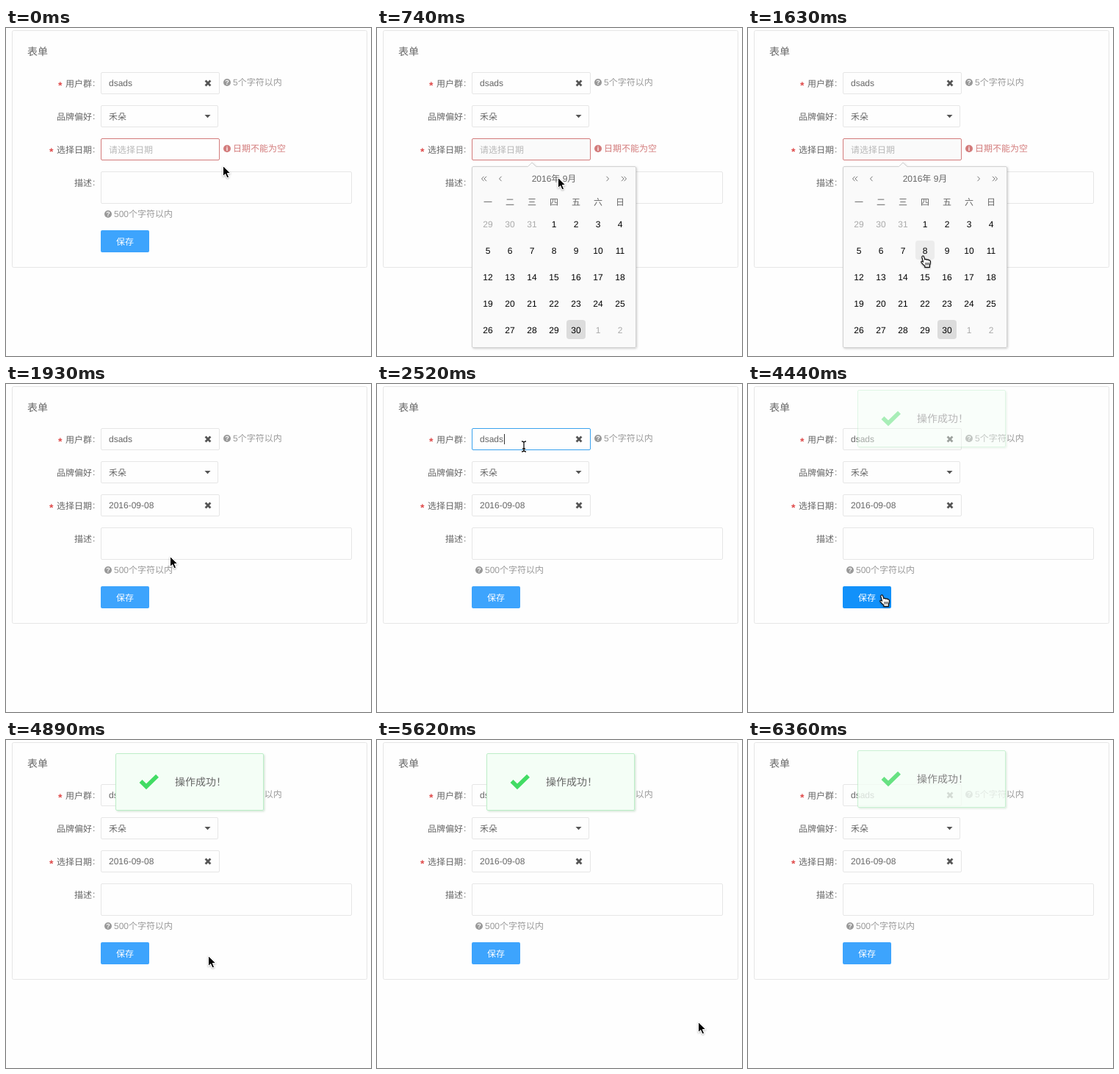
Animation of 497x446 px, one loop 6460 ms. Source, as an HTML page:

```html
<!DOCTYPE html>
<html lang="zh-CN">
<head>
<meta charset="utf-8">
<title>表单</title>
<style>
  html, body { margin: 0; width: 100%; height: 100%; overflow: hidden; background: #fefefe; }
  svg { display: block; position: absolute; left: 0; top: 0; }
  text { font: 12px "Liberation Sans", "Noto Sans CJK SC", "Noto Sans CJK", sans-serif; fill: #666; white-space: pre; text-rendering: geometricPrecision; }
  .big { font-size: 14px; }
  .hint { fill: #999; }
  .err { fill: #d37b7b; }
  .ghost { fill: #b8b8b8; }
  .star { font-size: 14px; font-weight: bold; fill: #e04c4c; }
  .mark { font-size: 9px; font-weight: bold; fill: #fefefe; text-anchor: middle; }
  .mid { text-anchor: middle; }
  .day { fill: #000; text-anchor: middle; }
  .off { fill: #aaa; text-anchor: middle; }
  .box { fill: #fefefe; stroke: #e6e6e6; }
  .cross { stroke: #555; stroke-width: 2.8; }
  .chev { fill: none; stroke: #777; }
</style>
</head>
<body>
<svg id="stage" width="497" height="446" viewBox="0 0 497 446">
  <defs>
    <filter id="shadow" x="-10%" y="-10%" width="120%" height="125%">
      <feDropShadow dx="1" dy="1" stdDeviation="1.5" flood-color="#000" flood-opacity=".2"/>
    </filter>
    <filter id="glow" x="-10%" y="-10%" width="120%" height="130%">
      <feDropShadow dx="1.5" dy="1.5" stdDeviation="1" flood-color="#3c8c50" flood-opacity=".22"/>
    </filter>
    <filter id="drop" x="-30%" y="-30%" width="170%" height="170%">
      <feDropShadow dx="0" dy="1" stdDeviation=".8" flood-opacity=".35"/>
    </filter>
  </defs>
  <g id="form"></g>
  <g id="popup" filter="url(#shadow)"></g>
  <g id="toast">
    <rect x="149.5" y=".5" width="201" height="77" rx="1.5" fill="#f4fef6" stroke="#bdeec8" filter="url(#glow)"/>
    <path d="M183.5 38L191 45.3L206 30.8" fill="none" stroke="#42dc64" stroke-width="5.6"/>
    <text class="big" x="230" y="44">操作成功！</text>
  </g>
  <g id="cursor">
    <path id="arrow" filter="url(#drop)" stroke="#fff" d="M.5 .5V14.6L3.7 11.6L6 16.8L8.6 15.7L6.3 10.6H10.8Z"/>
    <g id="hand" filter="url(#drop)" stroke="#111" stroke-linejoin="round">
      <path fill="#fff" stroke-width="1.2" d="M4.6 9.2L2.9 2.9C2.5 .9 5 .2 5.6 2.1L6.9 6C7.6 4.9 9.2 5.2 9.5 6.3C10.4 5.5 11.8 5.8 12.1 6.9C13.2 6.4 14.3 7 14.4 8.3C14.6 10.5 14.2 12 13.4 13.6V16.3H6.8V14.6C5.2 13.4 3.4 11.4 2.1 9.8C1.2 8.4 2.9 7.5 4.6 9.2Z"/>
      <path stroke-width=".9" d="M8 10V13.5M10 10V13.5M12 10V13.5"/>
    </g>
    <g id="beam" fill="none">
      <path stroke="#fff" stroke-width="2.6" d="M-3 -7Q0 -7 0 -5V5Q0 7 -3 7M3 -7Q0 -7 0 -5M0 5Q0 7 3 7"/>
      <path stroke="#111" stroke-width="1.3" d="M-3 -7Q0 -7 0 -5V5Q0 7 -3 7M3 -7Q0 -7 0 -5M0 5Q0 7 3 7M-2 3H2"/>
    </g>
  </g>
</svg>
<script>
const LOOP = 6460;
const STEP = 148; // the picture moves on once per step
const $ = id => document.getElementById(id);

const text = (x, y, s, cls = '') => `<text class="${cls}" x="${x}" y="${y}">${s}</text>`;
const box = (x, y, w, h, id = '') =>
  `<rect id="${id}" class="box" x="${x + .5}" y="${y + .5}" width="${w - 1}" height="${h - 1}" rx="1.5"/>`;
const cross = y => `<path class="cross" d="M271.6 ${y - 3.4}l6.8 6.8m0 -6.8l-6.8 6.8"/>`;
const hint = (x, y, s, mark = '?', cls = 'hint') =>
  `<circle class="${cls}" cx="${x}" cy="${y}" r="5"/>` + text(x, y + 3.2, mark, 'mark') + text(x + 8, y + 4.4, s, cls);
const chev = (x, dir) => `<path class="chev" d="M${x + 1.5 * dir} 201.8l${-3 * dir} 3.2l${3 * dir} 3.2"/>`;

function label(y, s, required) {
  const x = 117 - 12 * s.length;
  return (required ? text(x - 10, y + 8, '*', 'star') : '') + text(x, y + 4.5, s) + text(118, y + 4.3, ':');
}

function form() {
  const [name, brand, date, note] = [0, 1, 2, 3].map(i => 75 + 45 * i);
  return '<rect x="8.5" y="3.5" width="483" height="322" rx="2" fill="#fefefe" stroke="#e6e6e6"/>' +
    text(29, 37, '表单', 'big') +
    label(name, '用户群', true) + box(129, name - 15, 162, 30, 'name') + text(140, name + 4, 'dsads') + cross(name) +
    '<path id="caret" d="M173.5 68V82" stroke="#333"/>' + hint(301, name - 1, '5个字符以内') +
    label(brand, '品牌偏好') + box(129, brand - 15, 160, 30) + text(140, brand + 4.5, '禾朵') +
    '<path d="M270.5 118h8l-4 4.3z" fill="#555"/>' +
    label(date, '选择日期', true) + box(129, date - 15, 162, 30, 'date') +
    `<g id="empty">${text(140, date + 4.5, '请选择日期', 'ghost')}${hint(301, date - 1, '日期不能为空', 'i', 'err')}</g>` +
    `<g id="filled">${text(140, date + 4, '2016-09-08')}${cross(date)}</g>` +
    label(note, '描述') + box(129, note - 15, 342, 44) + hint(139, 253, '500个字符以内') +
    '<rect id="save" x="129" y="275" width="66" height="30" rx="2"/>' +
    '<text x="150" y="294.5" style="fill:#fff">保存</text>';
}

function calendar() {
  const col = i => 151 + 30 * (i % 7);
  const row = i => 266 + 36 * Math.floor(i / 7);
  const cell = (i, fill, id = '') =>
    `<rect id="${id}" x="${col(i) - 13}" y="${row(i) - 13}" width="26" height="26" rx="4" fill="${fill}"/>`;
  let s = '<path d="M131 188.5H205.5L211 183L216.5 188.5H351Q352.5 188.5 352.5 190V433Q352.5 434.5 351 434.5H131Q129.5 434.5 129.5 433V190Q129.5 188.5 131 188.5Z" fill="#fafafa" stroke="#d2d2d2"/>' +
    text(241, 209, '2016年 9月', 'mid') + cell(10, '#ececec', 'hover') + cell(32, '#dcdcdc');
  for (const dir of [1, -1]) for (const gap of [73, 93.5, 97]) s += chev(241 - gap * dir, dir);
  for (let i = 0; i < 7; i++) s += text(col(i), 240.5, '一二三四五六日'[i], 'mid');
  for (let i = 0; i < 35; i++) {
    const n = i - 2;
    const day = n < 1 ? n + 31 : n > 30 ? n - 30 : n;
    s += text(col(i), row(i) + 4.5, day, day === n ? 'day' : 'off');
  }
  return s;
}

$('form').innerHTML = form();
$('popup').innerHTML = calendar();

// key points of the pointer: step, x, y
const keys = [
  [0, 295, 187], [4, 250, 168], [8, 234, 309], [11, 234, 309], [17, 200, 85], [19, 200, 85],
  [24, 256, 163], [27, 178, 286], [30, 178, 286], [33, 275, 293], [35, 324, 304], [39, 475, 409]
];

const ramp = (k, a, b) => Math.min(1, Math.max(0, (k - a) / (b - a)));
const during = (k, a, b) => k >= a && k < b;
const show = (id, on) => $(id).style.display = on ? '' : 'none';

function pointer(k) {
  const i = Math.max(1, keys.findIndex(p => p[0] >= k));
  const [a, ax, ay] = keys[i - 1], [b, bx, by] = keys[i];
  const p = ramp(k, a, b);
  return [ax + (bx - ax) * p, ay + (by - ay) * p].map(Math.round);
}

function draw(k) {
  const hand = during(k, 8, 13) || during(k, 27, 31);
  const beam = during(k, 17, 20);
  const [x, y] = pointer(k);
  $('cursor').setAttribute('transform', `translate(${x} ${y})`);
  show('cursor', k < 40);
  show('hand', hand);
  show('beam', beam);
  show('arrow', !hand && !beam);

  const open = ramp(k, 3, 5) - ramp(k, 11, 13);
  const picked = k >= 12;
  $('popup').style.opacity = open;
  show('hover', k >= 8);
  show('empty', !picked);
  show('filled', picked);
  $('date').style.stroke = picked ? '#e6e6e6' : '#d37b7b';
  $('date').style.fill = open > 0 ? '#fafafa' : '#fefefe';

  $('name').style.stroke = during(k, 17, 28) ? '#3aa2ee' : '#e6e6e6';
  show('caret', during(k, 17, 20) || during(k, 24, 27));
  $('save').style.fill = during(k, 27, 31) ? '#1291fa' : '#3da4fd';

  const shown = ramp(k, 29, 31.2) - ramp(k, 42.8, 43.8);
  $('toast').style.opacity = shown;
  $('toast').setAttribute('transform', `translate(0 ${Math.round(18 * shown)})`);
}

const start = performance.now();
function tick() {
  const t = (performance.now() - start) % LOOP;
  draw(Math.min(43, Math.floor((t + 12) / STEP)));
  requestAnimationFrame(tick);
}
tick();
</script>
</body>
</html>
```
